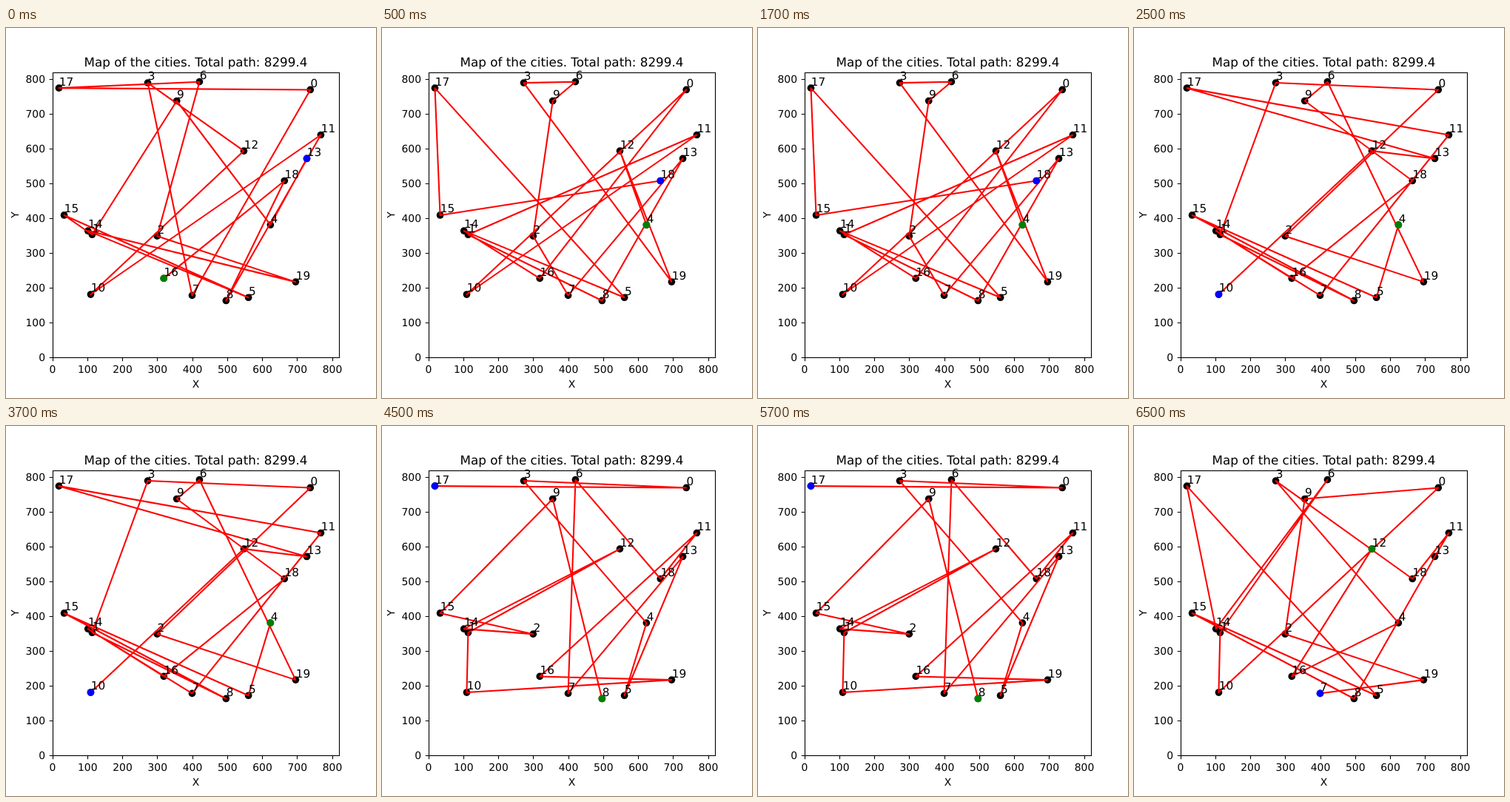
An HTML page for the animation above (8000 ms loop, 500 by 500 pixels).

```html
<!DOCTYPE html>
<html lang="en">
<head>
<meta charset="utf-8">
<title>Map of the cities</title>
<style>
  html, body { margin: 0; width: 100%; height: 100%; overflow: hidden; background: #fff; }
  svg { display: block; width: 100vw; height: 100vh; }
  text { font-family: "DejaVu Sans", sans-serif; font-size: 13.89px; text-rendering: geometricPrecision; }
  .mid { text-anchor: middle; }
  .end { text-anchor: end; }
  .title { font-size: 16.75px; }
  .label { font-size: 15.28px; }
  .axis { fill: none; stroke: #000; stroke-width: 1.11; }
  #route { fill: none; stroke: #f00; stroke-width: 2.08; stroke-linecap: square; stroke-linejoin: round; }
</style>
</head>
<body>
<svg viewBox="0 0 500 500">
  <g id="dots"></g>
  <polyline id="route"/>
  <circle id="first" r="4.86" fill="#008000"/>
  <circle id="last" r="4.86" fill="#00f"/>
  <g id="axes"><rect class="axis" x="63.5" y="60.5" width="387" height="385"/></g>
  <g id="labels"></g>
  <text class="mid title" x="256.5" y="52">Map of the cities. Total path: 8299.4</text>
  <text class="mid" x="256.5" y="485.5">X</text>
  <text class="mid" transform="translate(17 252.5) rotate(-90)">Y</text>
</svg>
<script>
const NS = 'http://www.w3.org/2000/svg';
const $ = id => document.getElementById(id);

// Map units (0 to 820) to stage pixels
const toX = v => 62.5 + v * 387.5 / 820;
const toY = v => 445 - v * 385 / 820;
const list = text => text.split(' ');

// One x,y point per city, in order of city number
const cities = list('738,770 114,353 300,349 273,790 624,381 561,172 421,793 ' +
  '400,178 497,163 356,738 110,181 768,640 548,594 728,572 102,364 34,409 ' +
  '319,227 19,775 664,508 696,217')
  .map(pair => pair.split(',').map(Number))
  .map(([x, y]) => [toX(x), toY(y)]);

// The order in which each tour visits the cities
const tours = [
  '16 18 8 11 10 12 3 7 0 17 6 2 19 14 5 15 1 9 4 13',
  '4 12 19 3 6 9 2 7 13 8 1 11 10 0 16 14 5 17 15 18',
  '4 5 15 8 1 3 0 2 19 6 9 18 16 14 7 11 17 13 12 10',
  '8 9 15 2 14 12 1 10 19 16 11 18 6 7 13 5 4 3 0 17',
  '12 16 4 3 18 11 13 8 15 5 17 14 6 1 10 0 9 2 19 7'
].map(order => list(order).map(n => cities[n]));

const LOOP = 8000;
const HOLD = 2000;
const LEAD = 1500; // the first tour is joined this far into its hold

function add(parent, tag, attrs, text) {
  const el = document.createElementNS(NS, tag);
  for (const key in attrs) el.setAttribute(key, attrs[key]);
  if (text !== undefined) el.textContent = text;
  $(parent).append(el);
}

for (let v = 0; v <= 800; v += 100) {
  const x = Math.round(toX(v)) + 0.5;
  const y = Math.round(toY(v)) + 0.5;
  add('axes', 'path', { class: 'axis', d: `M${x} 445.5v4.86M63.5 ${y}h-4.86` });
  add('axes', 'text', { class: 'mid', x: toX(v) + 0.5, y: 466 }, v);
  add('axes', 'text', { class: 'end', x: 53, y: y + 4.9 }, v);
}

cities.forEach(([x, y], i) => {
  add('dots', 'circle', { cx: x, cy: y, r: 4.86 });
  add('labels', 'text', { class: 'label', x: x + 0.3, y: Math.round(y - 3.6) }, i);
});

function place(id, [x, y]) {
  $(id).setAttribute('cx', x);
  $(id).setAttribute('cy', y);
}

let shown;
function draw(time) {
  const stops = tours[Math.floor((time % LOOP + LEAD) / HOLD)];
  if (stops === shown) return;
  shown = stops;
  $('route').setAttribute('points', stops.join(' '));
  place('first', stops[0]);
  place('last', stops[stops.length - 1]);
}

const begin = performance.now();
function tick() {
  draw(performance.now() - begin);
  requestAnimationFrame(tick);
}
tick();
</script>
</body>
</html>
```
